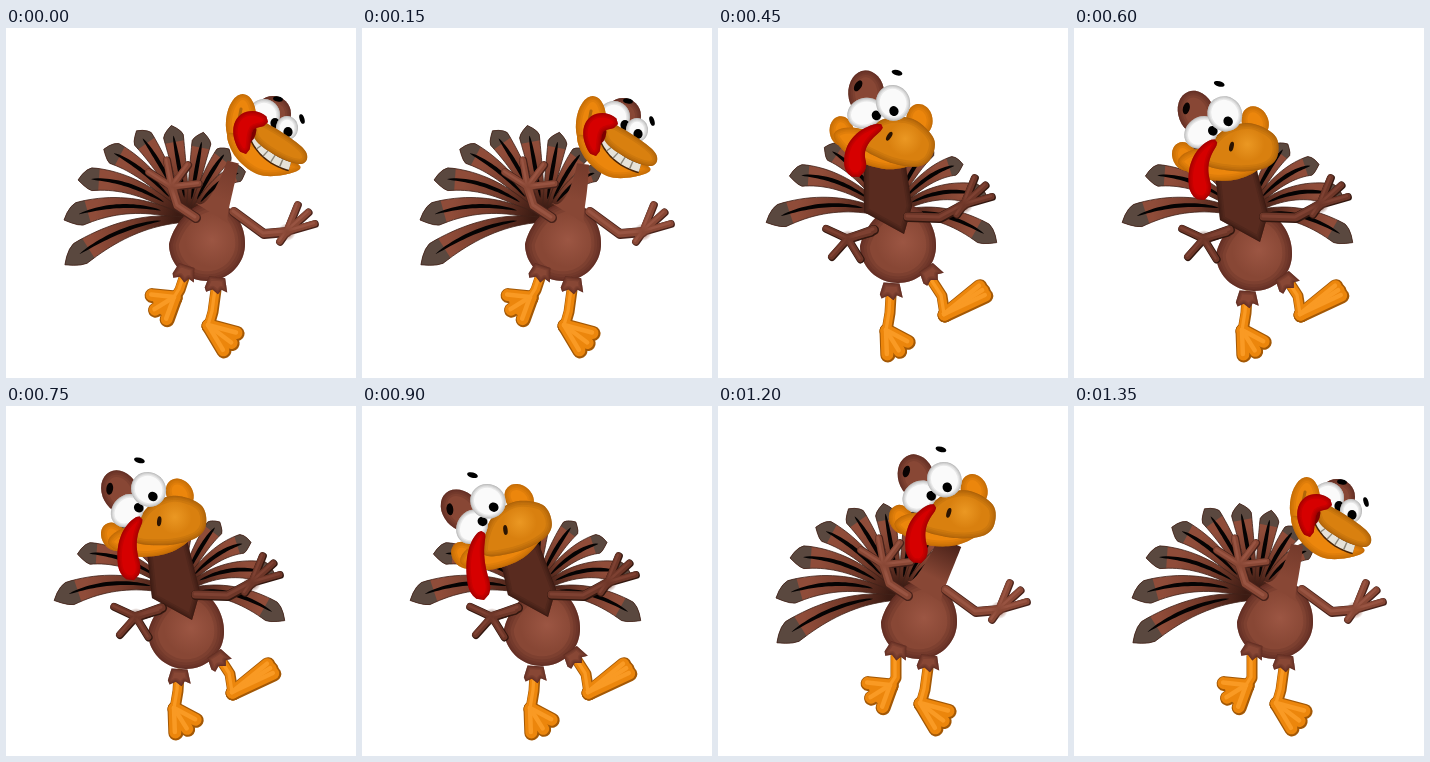
An HTML page with a canvas for the animation above (1500 ms loop, 350x350 px).

```html
<!DOCTYPE html>
<html lang="en">
<head>
<meta charset="utf-8">
<title>Dancing turkey</title>
<style>
html, body { margin: 0; width: 100%; height: 100%; overflow: hidden; background: #fff; }
canvas { display: block; width: 350px; height: 350px; }
</style>
</head>
<body>
<canvas id="stage" width="350" height="350"></canvas>
<script>
const ctx = document.getElementById('stage').getContext('2d');
const STEP = 150, RAD = Math.PI / 180, FEATHERS = 9;

// rim, base, light
const BROWN = ['#48221a', '#884735', '#985442'];
const DUSK = ['#32170f', '#6d3628', '#7e4132'];
const SHADE = ['#2c130d', '#592b1f', '#65332a'];
const ORANGE = ['#a35805', '#ec860c', '#f99a24'];
const BILL = ['#8f4d06', '#d9800f', '#f09a24'];
const RED = ['#7c0000', '#d60000', '#ee1010'];
const WHITE = ['#8c8c8c', '#fafafa', '#ffffff'];

// ---- poses
const leg = (joints, aim, spread, len) => ({ joints, aim, spread, len });
const arm = (joints, aim = 95, spread = 220, len = 24) => ({ joints, aim, spread, len });
const fan = (from, to, first, last, dip = 0) => ({ from, to, first, last, dip });

const poses = {
  lean: {
    body: [201, 216], root: [182, 192], tail: fan(-20, 140, 131, 75),
    legs: [
      leg([[178, 250], [174, 262], [169, 270]], 148, 76, 23),
      leg([[210, 262], [207, 284], [203, 298]], 37, 44, 29)
    ],
    arms: [
      arm([[190, 190], [172, 178], [166, 159]], -77, 141, 27),
      arm([[228, 184], [258, 206], [281, 204]])
    ]
  },
  stand: {
    body: [188, 207], root: [174, 182], tail: fan(2, 177, 138, 74),
    legs: [
      leg([[173, 252], [172, 275], [170, 299]], 56, 70, 23),
      leg([[205, 248], [205, 270], [203, 286]], 30, 28, 32)
    ],
    arms: [
      arm([[172, 186], [160, 184], [150, 192]]),
      arm([[213, 176], [240, 194], [264, 191]])
    ]
  },
  step: {
    body: [190, 206], root: [174, 182], tail: fan(-3, 174, 138, 62),
    legs: [
      leg([[171, 252], [169, 275], [168, 297]], 85, 110, 13),
      leg([[210, 248], [214, 270], [215, 288]], -12, 18, 43)
    ],
    arms: [
      arm([[172, 182], [158, 182], [150, 195]]),
      arm([[214, 176], [236, 196], [261, 194]])
    ]
  },
  kick: {
    body: [180, 218], root: [172, 188], tail: fan(-3, 194, 124, 110, .3),
    legs: [
      leg([[173, 268], [172, 285], [169, 303]], 58, 60, 24),
      leg([[213, 251], [224, 268], [227, 287]], -32, 14, 45)
    ],
    arms: [
      arm([[156, 202], [142, 207], [130, 211]]),
      arm([[190, 189], [222, 190], [246, 177]])
    ]
  }
};

// ---- one entry per step
const side = (x, y, shut) => ({ x, y, shut, side: true });
const front = (x, y, tilt) => ({ x, y, tilt });
const frames = [
  { pose: 'lean', head: side(255, 109) },
  { pose: 'lean', head: side(249, 111) },
  { pose: 'stand', head: side(224, 95, true) },
  { pose: 'kick', head: front(161, 80, 20) },
  { pose: 'kick', drop: 8, head: front(139, 95, 38) },
  { pose: 'kick', drop: 8, head: front(132, 94, 45) },
  { pose: 'kick', drop: 5, head: front(118, 108, 58) },
  { pose: 'step', head: front(158, 75, 54) },
  { pose: 'lean', swing: 10, head: front(214, 82, 34) },
  { pose: 'lean', swing: 10, head: side(251, 114) }
];

// ---- shape helpers
const mix = (a, b, u) => a + (b - a) * u;
const polar = ([x, y], deg, r) => [x + r * Math.cos(deg * RAD), y + r * Math.sin(deg * RAD)];

function polygon(pts) {
  const p = new Path2D();
  pts.forEach(q => p.lineTo(...q));
  p.closePath();
  return p;
}

// smooth closed curve through points
function blob(pts) {
  const p = new Path2D(), n = pts.length, at = i => pts[(i + n) % n];
  p.moveTo(...pts[0]);
  for (let i = 0; i < n; i++) {
    const [a, b, c, d] = [at(i - 1), at(i), at(i + 1), at(i + 2)];
    p.bezierCurveTo(b[0] + (c[0] - a[0]) / 6, b[1] + (c[1] - a[1]) / 6,
      c[0] - (d[0] - b[0]) / 6, c[1] - (d[1] - b[1]) / 6, c[0], c[1]);
  }
  return p;
}

function oval(x, y, rx, ry = rx, rot = 0) {
  const p = new Path2D();
  p.ellipse(x, y, rx, ry, rot, 0, 7);
  return p;
}

// band of varying half-width along a quadratic curve
function ribbon(a, b, c, width, from = 0, to = 1) {
  const left = [], right = [], n = 24;
  for (let i = 0; i <= n; i++) {
    const u = mix(from, to, i / n), v = 1 - u;
    const pos = k => v * v * a[k] + 2 * u * v * b[k] + u * u * c[k];
    const dir = k => v * (b[k] - a[k]) + u * (c[k] - b[k]);
    const w = width(u) / (Math.hypot(dir(0), dir(1)) || 1);
    left.push([pos(0) - dir(1) * w, pos(1) + dir(0) * w]);
    right.unshift([pos(0) + dir(1) * w, pos(1) - dir(0) * w]);
  }
  return polygon(left.concat(right));
}

function fill(path, color) {
  ctx.fillStyle = color;
  ctx.fill(path);
}

// filled shape that darkens towards its edge
function solid(path, pal, depth = 1) {
  fill(path, pal[1]);
  ctx.save();
  ctx.clip(path);
  ctx.strokeStyle = pal[0];
  ctx.globalAlpha = .17;
  for (const w of [15, 10, 6, 3, 1.5]) {
    ctx.lineWidth = w * depth;
    ctx.stroke(path);
  }
  ctx.restore();
}

function glow(x, y, r, color) {
  const g = ctx.createRadialGradient(x, y, 0, x, y, r);
  g.addColorStop(0, color);
  g.addColorStop(1, color + '00');
  fill(oval(x, y, r), g);
}

function line(pts, width, color) {
  ctx.lineWidth = width;
  ctx.strokeStyle = color;
  ctx.beginPath();
  pts.forEach(p => ctx.lineTo(...p));
  ctx.stroke();
}

// all parts share each tone so that they merge
function limb(joints, tips, pal, thick, tipThick, webbed) {
  const end = joints[joints.length - 1];
  [1, .8, .3].forEach((k, i) => {
    ctx.save();
    ctx.translate(-i * .5, -i * .5);
    line(joints, thick * k, pal[i]);
    tips.forEach(t => line([end, t], tipThick * k, pal[i]));
    if (webbed && i < 2) fill(polygon([end, ...tips]), pal[i]);
    ctx.restore();
  });
}

const spread = (from, n, aim, angle, len) =>
  Array.from({ length: n }, (_, i) => polar(from, aim + angle * (i / (n - 1) - .5), len));

// ---- parts
function feather(root, tip) {
  const dx = tip[0] - root[0], dy = tip[1] - root[1], len = Math.hypot(dx, dy);
  const mid = [root[0] + dx * .5, root[1] + dy * .5 - 28 * Math.abs(dx) / len];
  const size = 12 * Math.min(1, .3 + len / 180);
  const width = u => u < .87
    ? mix(2, size, (u / .87) ** .9)
    : size * (1 - ((u - .87) / .13) ** 1.6);
  const g = ctx.createRadialGradient(...root, 12, ...root, len * .75);
  g.addColorStop(0, '#3c1b13');
  g.addColorStop(.5, '#743a2a');
  g.addColorStop(1, '#8f4c39');
  const whole = ribbon(root, mid, tip, width);
  fill(whole, g);
  fill(ribbon(root, mid, tip, width, .81), '#5a483f');
  ctx.lineWidth = .8;
  ctx.strokeStyle = '#40221a';
  ctx.stroke(whole);
  const vein = u => 2 * Math.sqrt(Math.sin(Math.PI * (u - .22) / .66));
  fill(ribbon(root, mid, tip, vein, .221, .879), '#050303');
}

function tail({ root, tail: { from, to, first, last, dip } }) {
  const order = Array.from({ length: FEATHERS }, (_, i) => i / (FEATHERS - 1))
    .sort((a, b) => Math.abs(a - .5) - Math.abs(b - .5));
  for (const u of order) {
    const len = mix(first, last, u) * (1 - dip * Math.sin(Math.PI * u));
    feather(root, polar(root, 180 + mix(from, to, u), len));
  }
}

function foot({ joints, aim, spread: angle, len }, swing) {
  const moved = joints.map(([x, y], i) => i ? [x + swing * .4, y + swing] : [x, y]);
  const heel = moved[moved.length - 1];
  limb(moved, spread(heel, 3, aim, angle, len), ORANGE, 11, 15, true);
}

function hand({ joints, aim, spread: angle, len }, right, pal) {
  const palm = joints[joints.length - 1];
  const tips = right
    ? [...spread(palm, 3, -42, 52, 29), polar(palm, 125, 12)]
    : spread(palm, 4, aim, angle, len);
  limb(joints, tips, pal, 10, 8);
  glow(...palm, 9, pal[1]);
}

function cuff([x, y], turn) {
  ctx.save();
  ctx.translate(x, y);
  ctx.rotate(turn);
  solid(new Path2D('M-8-9L8-9L12 5L6 3L3 8L-3 4L-9 7L-11 3Z'), BROWN, .5);
  ctx.restore();
}

function torso(x, y) {
  const pts = spread([0, 0], 41, 0, 360, 1).map(([c, s]) => {
    const up = Math.max(0, -s);
    return [x + 38 * c * (1 - .12 * up) + 5 * up, y + (s > 0 ? 37 : 42) * s];
  });
  solid(blob(pts), BROWN, 1.3);
  glow(x + 5, y - 4, 27, '#9c5643');
}

function neck(x, y, head, shaded) {
  const t = (head.tilt || 0) * RAD, c = Math.cos(t), s = Math.sin(t);
  const top = head.side
    ? [head.x - 28, head.y + 25]
    : [head.x - 15 * c + 55 * s, head.y + 15 * s + 55 * c];
  if (shaded) {
    solid(polygon([[top[0] - 20, top[1] - 5], [x - 34, y - 34], [x + 6, y - 12],
      [x + 14, y - 40], [top[0] + 20, top[1] - 12]]), SHADE, .7);
    return;
  }
  const base = [x + 6, y - 30];
  const g = ctx.createLinearGradient(...base, ...top);
  g.addColorStop(.3, BROWN[1]);
  g.addColorStop(1, head.side ? '#743a2b' : '#4a2219');
  const slim = head.side ? 15 : 9;
  fill(ribbon(base, [x + 16, y - 46], top, u => 21 - slim * u ** .35), g);
}

function eye(x, y, rx, ry, px, py) {
  solid(oval(x, y, rx, ry), WHITE, .5);
  fill(oval(px, py, 4.6, 5), '#000');
}

function sideHead({ x, y, shut }) {
  ctx.save();
  ctx.translate(x, y);
  solid(oval(12, -23, 18, 18), BROWN, .8);
  if (shut) {
    line([[11, -28], [18, -25]], 3, '#140806');
  } else {
    eye(3, -22, 16, 16, 14, -14);
    eye(26, -9, 11, 12, 27, -5);
  }
  fill(oval(17, -38, 5, 2.6, .2), '#000');
  fill(oval(41, -18, 2.4, 5, -.3), '#000');
  solid(oval(-20, -16, 15, 27, .1), ORANGE, .8);
  line([[-20, -28], [-22, -18]], 3, '#b0660a');
  solid(blob([[-32, -4], [-26, 19], [-4, 37], [22, 38], [39, 29], [4, 10]]), ORANGE, .8);
  const lip = [[-6, 1], [4, 22], [29, 29]];
  fill(ribbon(...lip, () => 5.5), '#4a2405');
  fill(ribbon(...lip, () => 4), '#e6e2d8');
  for (let u = .2; u < .9; u += .2)
    fill(ribbon(...lip, () => 4, u, u + .03), '#8b8578');
  solid(blob([[-7, -18], [14, -9], [41, 10], [46, 22], [37, 27], [14, 18], [-6, 2]]), BILL, .7);
  fill(oval(-14, -5, 9, 13, .3), RED[0]);
  solid(ribbon([7, -15], [-28, -26], [-15, 17],
    u => 10 * Math.max(0, Math.sin(Math.PI * u)) ** .35), RED, .6);
  ctx.restore();
}

function frontHead({ x, y, tilt }) {
  ctx.save();
  ctx.translate(x, y);
  ctx.save();
  ctx.rotate(-tilt * RAD);
  solid(oval(-7, -18, 18, 23, .3), BROWN, .9);
  fill(oval(-12, -28, 3.4, 6, .9), '#0a0302');
  solid(oval(34, 25, 13, 16, .2), ORANGE, .8);
  solid(oval(-43, 9, 12, 15, .2), ORANGE, .8);
  solid(blob([[-52, 10], [-30, 10], [10, 40], [14, 63], [-14, 60], [-42, 38]]), ORANGE, .8);
  solid(blob([[-32, 24], [0, 12], [28, 22], [41, 48], [30, 66], [12, 67], [-14, 50]]), BILL, .8);
  glow(14, 38, 17, '#eb9823');
  fill(oval(0, 30, 2.2, 5, .9), '#2b1402');
  eye(-15, 0, 18, 15, -5, 6);
  eye(15, 0, 17, 18, 13, 8);
  fill(oval(29, -27, 5.5, 2.7, tilt * RAD + .25), '#000');
  ctx.restore();
  // the wattle hangs straight down whatever the tilt
  const end = [.62 * tilt - 32, 60 + .45 * tilt];
  solid(ribbon([3, 18], [end[0] - 16, end[1] * .5], end, u => u < .8
    ? 2 + 9 * Math.sqrt(u / .8)
    : 11 * Math.sqrt(Math.max(0, 1 - ((u - .8) / .2) ** 2))), RED, .6);
  ctx.restore();
}

function draw({ pose, drop = 0, swing = 0, head }) {
  const p = poses[pose], x = p.body[0], y = p.body[1] + drop, kick = pose === 'kick';
  ctx.fillStyle = '#fff';
  ctx.fillRect(0, 0, 350, 350);
  ctx.lineCap = ctx.lineJoin = 'round';
  tail(p);
  p.legs.forEach((l, i) => foot(l, i ? 0 : swing));
  torso(x, y);
  p.legs.forEach(({ joints: [[hx, hy], [kx, ky]] }) =>
    cuff([hx, hy - 4 + drop], Math.atan2(hx - kx, ky - hy)));
  neck(x, y, head, kick);
  p.arms.forEach((a, i) => hand(a, i > 0, kick ? DUSK : BROWN));
  (head.side ? sideHead : frontHead)(head);
}

const start = performance.now();
function tick() {
  const t = Math.max(0, performance.now() - start);
  draw(frames[Math.floor(t / STEP) % frames.length]);
  requestAnimationFrame(tick);
}
tick();
</script>
</body>
</html>
```
